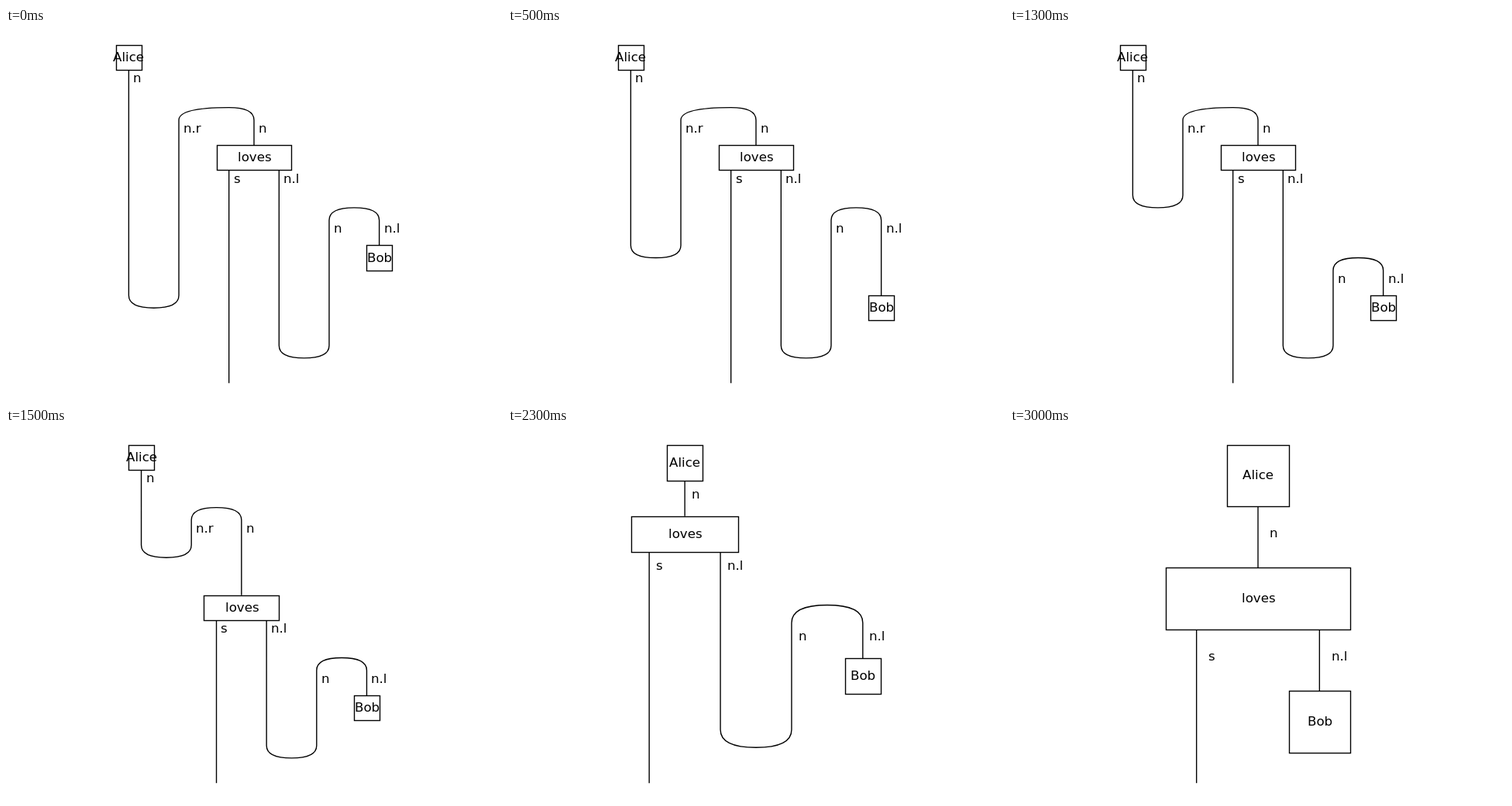
These frames come from a looping animation (640x480 px, 3.5 s). An HTML page with a canvas:

```html
<!DOCTYPE html>
<html lang="en">
<head>
<meta charset="utf-8">
<title>String diagram rewriting</title>
<style>
html, body { margin: 0; width: 100%; height: 100%; overflow: hidden; background: #fff; }
canvas { display: block; }
</style>
</head>
<body>
<canvas id="stage" width="640" height="480"></canvas>
<script>
const ctx = document.getElementById('stage').getContext('2d');
const STEP_MS = 500, MARGIN = 480 / 22, SPAN = 480 / 1.1;

// Lengths are in diagram units: x from the centre, y from the top.
// subject/verb/object: [x, y] of each box; left/right: bends of the two wires.
const tall = {
  height: 6.75, subject: [-2.5, 0], verb: [0, 2], object: [2.5, 4],
  left: { cup: 5, cap: 1.5, apex: -0.5 }, right: { cup: 6, cap: 3.5 }
};
const short = {
  height: 4.75, subject: [-1, 0], verb: [-1, 1], object: [1.5, 3],
  right: { cup: 4, cap: 2.5 }
};
const steps = [
  tall,
  { ...tall, object: [2.5, 5], left: { ...tall.left, cup: 4 } },
  { ...tall, object: [2.5, 5], left: { ...tall.left, cup: 3 }, right: { cup: 6, cap: 4.5 } },
  {
    ...tall, subject: [-2.25, 0], verb: [-0.25, 3], object: [2.25, 5],
    left: { cup: 2, cap: 1.5, apex: -0.75 }, right: { cup: 6, cap: 4.5 }
  },
  short,
  { ...short, object: [1.5, 4], right: { cup: 3, cap: 2.5 } },
  { height: 2.75, subject: [0, 0], verb: [0, 1], object: [0.5, 2] }
];

let unit;
const px = x => 320 + x * unit;
const py = y => MARGIN + y * unit;
const snap = v => Math.round(v) + 0.5;

function label(text, x, y) {
  ctx.fillText(text, Math.floor(px(x + 0.1)), Math.round(py(y + 0.25)));
}

function box(text, [x, y], width = 0.5) {
  const left = snap(px(x - width / 2)), right = snap(px(x + width / 2));
  const top = snap(py(y)), bottom = snap(py(y + 0.5));
  ctx.fillStyle = '#fff';
  ctx.fillRect(left, top, right - left, bottom - top);
  ctx.strokeRect(left, top, right - left, bottom - top);
  ctx.fillStyle = '#000';
  const m = ctx.measureText(text);
  const ink = m.actualBoundingBoxRight + m.actualBoundingBoxLeft;
  ctx.fillText(text, Math.round(px(x) - ink / 2), Math.round(py(y + 0.25) + 4.95));
}

// A half turn from x0 to x1 with legs at y, reaching depth at the apex.
function bend(x0, x1, y, depth, apex = (x0 + x1) / 2) {
  const peak = py(y + depth);
  ctx.lineTo(px(x0), py(y));
  ctx.quadraticCurveTo(px(x0), peak, px(apex), peak);
  ctx.quadraticCurveTo(px(x1), peak, px(x1), py(y));
}

function wire(x0, y0, x1, y1, turns) {
  ctx.beginPath();
  ctx.moveTo(px(x0), py(y0));
  if (turns) {
    bend(x0, x0 + 1, turns.cup, 0.25);
    bend(x0 + 1, x1, turns.cap, -0.25, turns.apex);
  }
  ctx.lineTo(px(x1), py(y1));
  ctx.stroke();
}

function draw({ height, subject, verb, object, left, right }) {
  unit = SPAN / height;
  ctx.fillStyle = '#fff';
  ctx.fillRect(0, 0, 640, 480);
  ctx.fillStyle = '#000';
  ctx.lineWidth = 100 / 72;
  ctx.font = '16.6667px "DejaVu Sans", sans-serif';

  const [sx] = subject, [vx, vy] = verb, [ox, oy] = object;
  const out = vy + 0.5;
  wire(sx, 0.5, vx, vy, left);
  wire(vx - 0.5, out, vx - 0.5, height);
  wire(vx + 0.5, out, ox, oy, right);

  label('n', sx, 0.5);
  label('s', vx - 0.5, out);
  label('n.l', vx + 0.5, out);
  if (left) {
    label('n.r', sx + 1, left.cap);
    label('n', vx, left.cap);
  }
  if (right) {
    label('n', vx + 1.5, right.cap);
    label('n.l', ox, right.cap);
  }

  box('Alice', subject);
  box('loves', verb, 1.5);
  box('Bob', object);
}

function tick() {
  draw(steps[Math.floor(performance.now() / STEP_MS) % steps.length]);
  requestAnimationFrame(tick);
}
tick();
</script>
</body>
</html>
```
